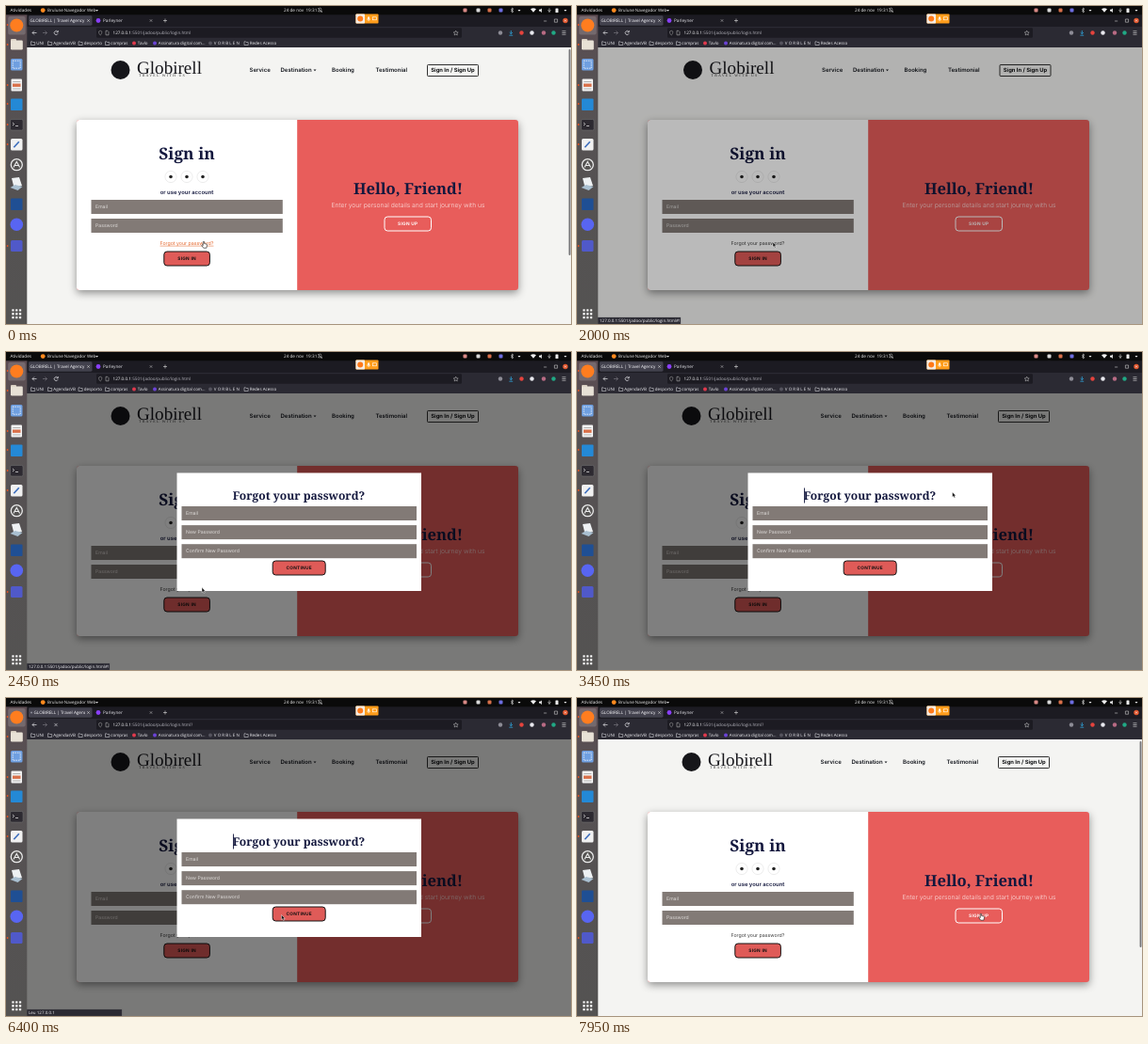
These frames come from a looping animation (600x338 px, 8000 ms). An HTML page:

```html
<!DOCTYPE html>
<html lang="en">
<head>
<meta charset="utf-8">
<title>Sign in</title>
<style>
  html, body { margin: 0; width: 100%; height: 100%; overflow: hidden; background: #000; }
  svg { display: block; width: 600px; height: 338px; }
  text { white-space: pre; text-rendering: geometricPrecision; }
  .ui { font-family: "Open Sans", "Noto Sans", sans-serif; }
  .body { font-family: Inter, "Open Sans", sans-serif; }
  .head { font-family: "Noto Serif", serif; font-weight: 700; fill: #14183e; }
  .brand { font-family: "Liberation Serif", serif; }
  .card { filter: drop-shadow(0 3px 4px rgba(0, 0, 0, .42)); }
</style>
</head>
<body>
<svg id="stage" viewBox="0 0 600 338"></svg>
<script>
const stage = document.getElementById('stage');
const LOOP = 8000;

function add(parent, tag, attrs, content) {
  const node = document.createElementNS('http://www.w3.org/2000/svg', tag);
  for (const key in attrs) node.setAttribute(key, attrs[key]);
  if (content !== undefined) node.textContent = content;
  return parent.appendChild(node);
}
const group = (parent, attrs = {}) => add(parent, 'g', attrs);
const rect = (parent, x, y, width, height, fill, more = {}) =>
  add(parent, 'rect', { x, y, width, height, fill, ...more });
const dot = (parent, cx, cy, r, fill, more = {}) =>
  add(parent, 'circle', { cx, cy, r, fill, ...more });
const line = (parent, d, stroke, width = .7, more = {}) =>
  add(parent, 'path', { d, stroke, 'stroke-width': width, fill: 'none', ...more });
const label = (parent, cls, x, y, size, fill, content, more = {}) =>
  add(parent, 'text', { class: cls, x, y, 'font-size': size, fill, ...more }, content);
const MID = { 'text-anchor': 'middle' };
const SEMI = { 'font-weight': 600 };
const BOLD = { 'font-weight': 700 };
const show = (node, on) => node.setAttribute('visibility', on ? 'visible' : 'hidden');

// ---- page ----
const page = group(stage);
rect(page, 22, 44, 578, 294, '#f4f4f2');

const nav = group(page);
dot(nav, 121.5, 68, 10, '#16161a');
label(nav, 'brand', 139, 72, 19.1, '#17171c', 'Globirell');
label(nav, 'brand', 141, 75.2, 4, '#333', 'TRAVEL WITH US', { 'letter-spacing': 1.25 });
[[258.5, 'Service'], [291.5, 'Destination'], [346, 'Booking'], [392.5, 'Testimonial']]
  .forEach(([x, word]) => label(nav, 'body', x, 70.2, 6.05, '#14171e', word, SEMI));
add(nav, 'path', { d: 'M326.5 67.6h3l-1.5 1.7z', fill: '#14171e' });
rect(nav, 447.5, 62.5, 54, 12, 'none', { rx: .8, stroke: '#1a1a1a', 'stroke-width': .9 });
label(nav, 'body', 474.5, 70.4, 5.85, '#0c0d10', 'Sign In / Sign Up', { ...BOLD, ...MID });

function field(parent, x, y, width, hint) {
  rect(parent, x, y, width, 15, '#827a76');
  label(parent, 'body', x + 4.6, y + 9.2, 5.1, '#dedbd9', hint);
}
function button(parent, x, y, width, word, fill, stroke, ink) {
  rect(parent, x, y, width, 15, fill, { rx: 3.2, stroke, 'stroke-width': 1 });
  label(parent, 'body', x + width / 2, y + 9.2, 4.75, ink, word,
    { ...BOLD, 'letter-spacing': .28, ...MID });
}

rect(page, 75, 121, 469, 181, '#e85d5b', { rx: 3.2, class: 'card' });
add(page, 'path', { d: 'M309.2 121H78.2a3.2 3.2 0 0 0-3.2 3.2v174.6a3.2 3.2 0 0 0 3.2 3.2H309.2z', fill: '#fff' });

label(page, 'head', 192, 162.7, 17.3, '', 'Sign in', MID);
[175, 192, 209].forEach(x => {
  dot(page, x, 181.5, 6.1, '#fff', { stroke: '#d8d8d8', 'stroke-width': .5 });
  dot(page, x, 181.5, 1.8, '#222');
});
label(page, 'body', 192, 199.5, 5.9, '#14183e', 'or use your account', { ...SEMI, ...MID });
field(page, 90.5, 206, 203.3, 'Email');
field(page, 90.5, 226, 203.3, 'Password');
const link = label(page, 'body', 192, 253.8, 5.25, '#333', 'Forgot your password?', MID);
button(page, 167.8, 261, 48.6, 'SIGN IN', '#df5b58', '#151515', '#111');

label(page, 'head', 427, 199.5, 16.55, '', 'Hello, Friend!', MID);
label(page, 'body', 427, 214.1, 6.78, '#fbe3e2', 'Enter your personal details and start journey with us',
  { 'font-weight': 300, ...MID });
button(page, 402, 224, 49.5, 'SIGN UP', 'none', '#fff', '#fff');

const scrollbar = rect(page, 597.6, 46, 1.9, 219, '#77777a', { rx: .9 });
const backdrop = rect(page, 22, 44, 578, 294, '#000');

// ---- dialog ----
const modal = group(stage);
rect(modal, 181.5, 128.5, 259.5, 125.5, '#fff');
label(modal, 'head', 311, 156.8, 12.1, '', 'Forgot your password?', MID);
['Email', 'New Password', 'Confirm New Password']
  .forEach((hint, i) => field(modal, 186.5, 164 + 20.1 * i, 249.5, hint));
button(modal, 283.2, 222, 56, 'CONTINUE', '#df5b58', '#151515', '#111');
const caret = rect(modal, 241, 144.5, .9, 16, '#14183e');

// ---- browser ----
const chrome = group(stage);
rect(chrome, 22, 9, 578, 13, '#1c1b22');
rect(chrome, 22, 22, 578, 22, '#2b2a33');
rect(chrome, 24, 10.3, 67.5, 10.4, '#42414d', { rx: 1.4 });
const tabClip = add(chrome, 'clipPath', { id: 'tab' });
rect(tabClip, 24, 10, 60, 11, '#fff');
const tabText = label(group(chrome, { 'clip-path': 'url(#tab)' }), 'ui', 25.5, 17.2, 4.6, '#fbfbfe',
  'GLOBIRELL | Travel Agency - L');
const tabDot = dot(chrome, 27, 15.5, 1, '#8f8f9d');
const cross = (x, y, r, color) =>
  line(chrome, `M${x - r} ${y - r}l${2 * r} ${2 * r}m0 ${-2 * r}l${-2 * r} ${2 * r}`, color, .6);
cross(87.5, 15.5, 1.2, '#ddd');
dot(chrome, 98, 15.5, 2.4, '#8a3ffc');
label(chrome, 'ui', 103, 17.2, 4.7, '#e4e4ea', 'Parleyner');
cross(154, 15.5, 1.2, '#bbb');
line(chrome, 'M167 15.5h4m-2-2v4', '#ddd', .6);
line(chrome, 'M571 16h3.2M582.4 14h3.2v3.2h-3.2z', '#ccc', .6);
dot(chrome, 594, 15.5, 2.7, '#e2552b');
cross(594, 15.5, 1, '#fff');

line(chrome, 'M32.5 28.5h-4.5m2-2l-2 2 2 2', '#e6e6ea', .7);
line(chrome, 'M39 28.5h4.5m-2-2l2 2-2 2', '#77767f', .7);
const reload = line(chrome, 'M55 27.6a2 2 0 1 0 .1 1.7M55.3 26v1.8h-1.8', '#e6e6ea');
const stop = cross(53, 28.5, 1.6, '#e6e6ea');
rect(chrome, 96, 23.3, 388, 10.4, '#1c1b22', { rx: 1.3 });
line(chrome, 'M98.6 27l1.6-.8 1.6.8c0 2-.4 3.2-1.6 4-1.2-.8-1.6-2-1.6-4z', '#aaa', .5);
line(chrome, 'M106 26.3h1.8l1.2 1.2v3.3h-3z', '#ccc', .5);
const url = label(chrome, 'ui', 113.5, 30.2, 4.6, '#b5b4bd', '');
add(url, 'tspan', { fill: '#fbfbfe' }, '127.0.0.1');
const path = add(url, 'tspan', {}, '');
line(chrome, 'M477.7 26.2l.7 1.6 1.8.2-1.3 1.2.4 1.8-1.6-.9-1.6.9.4-1.8-1.3-1.2 1.8-.2z', '#ccc', .5);
line(chrome, 'M536.3 26v3.6m-1.6-1.5l1.6 1.6 1.6-1.6M534.4 31.2h3.8', '#2fb6f5', .7);
[[525, '#8d8c96'], [547.5, '#e5433d'], [558.5, '#e8e8ee'], [571, '#b96b84'], [581.5, '#20a884']]
  .forEach(([x, c]) => dot(chrome, x, 28.5, 2.2, c));
line(chrome, 'M590.5 26.7h4M590.5 28.5h4M590.5 30.3h4', '#ddd', .6);

const folder = (x, y) =>
  line(chrome, `M${x} ${y}h1.5l.6.7h2.1v3h-4.2z`, '#d5d5da', .55);
[[26.5, 'UNI'], [44.5, 'AgendasVB'], [77, 'desporto'], [105.5, 'compras'], [134, 'Tavlo', '#e0394d'],
 [156, 'Assinatura digital com…', '#6b43d6'], [215, 'V O R B L E N', '#55545e'], [253, 'Redes Acesso']]
  .forEach(([x, name, color]) => {
    if (color) dot(chrome, x + 2, 39.6, 2, color);
    else folder(x, 37.8);
    label(chrome, 'ui', x + 5.8, 41.3, 4.5, '#f0f0f4', name);
  });

const status = group(chrome);
const statusBox = rect(status, 22, 331, 88, 7, '#2b2a33', { stroke: '#4a4953', 'stroke-width': .3 });
const statusText = label(status, 'ui', 24, 336.4, 4.5, '#f0f0f4', '');

// ---- desktop bar ----
rect(stage, 0, 0, 600, 9.3, '#0a0a0a');
label(stage, 'ui', 4.5, 6.3, 4.7, '#eee', 'Atividades');
dot(stage, 39.2, 4.6, 2.4, '#ff8a1e');
label(stage, 'ui', 44, 6.3, 4.5, '#eee', 'Brulune Navegador Web');
add(stage, 'path', { d: 'M95 4h3l-1.5 1.8z', fill: '#ddd' });
label(stage, 'ui', 295, 6.3, 4.65, '#eee', '24 de nov  19:31');
line(stage, 'M331.5 5.8h4l-.7-1.2v-1.2a1.3 1.3 0 0 0-2.6 0v1.2zM331.2 2l4.6 5', '#ddd', .5);
[[487.5, '#d98a86'], [501.5, '#d9d9d9'], [513.5, '#d8704a'], [525.5, '#6d6de0']]
  .forEach(([x, c]) => rect(stage, x - 2, 2.6, 4, 4, c, { rx: 1 }));
line(stage, 'M537.5 2v5m-1.5-3.8l3 2.6-1.5 1.2m-1.5-1.2l3-2.6-1.5-1.2', '#eee', .5);
add(stage, 'path', {
  d: 'M543.5 4h3l-1.5 1.8zM557 3.2q3-2 6 0l-3 3.6zM566 3.8h1.3l1.6-1.4v4.6l-1.6-1.4h-1.3zM592.5 4h3l-1.5 1.8z',
  fill: '#eee'
});
line(stage, 'M577 2.4v2.4m-1.3-.6a1.3 1.3 0 0 0 2.6 0M577 5.6v1.4', '#eee', .6);
rect(stage, 583.5, 2.6, 3, 4.4, '#eee', { rx: .5 });

rect(stage, 371.5, 8.5, 24, 10, '#ff9d1c', { rx: .8 });
rect(stage, 371.5, 8.5, 9.5, 10, '#f4ede6', { rx: .8 });
dot(stage, 376.2, 13.5, 3, '#ff7a1a');
rect(stage, 384.2, 11.3, 1.8, 3.4, '#fff', { rx: .9 });
line(stage, 'M383.4 13.5a1.7 1.7 0 0 0 3.4 0M385.1 15.2v1', '#fff', .5);
rect(stage, 389.4, 11.8, 4, 3, 'none', { stroke: '#fff', 'stroke-width': .6 });

// ---- dock ----
const fade = add(add(stage, 'defs', {}), 'linearGradient', { id: 'dock', x2: 0, y2: 1 });
[[0, '#5c4c52'], [.2, '#565153'], [1, '#545352']]
  .forEach(([offset, color]) => add(fade, 'stop', { offset, 'stop-color': color }));
rect(stage, 0, 9.3, 22.3, 328.7, 'url(#dock)');
rect(stage, 2.2, 11, 18.4, 19.5, '#fff', { opacity: .16, rx: 2 });
dot(stage, 11.3, 20.5, 7, '#ff7d1f');
rect(stage, 5, 35, 6, 4, '#d9cfc2', { rx: 1 });
rect(stage, 5, 36.5, 12.8, 10, '#e8e1d6', { rx: 1.2 });
rect(stage, 5, 56, 12.5, 12.5, '#6f9fe0', { rx: 1.5 });
rect(stage, 7.2, 58.2, 8, 8, 'none', { stroke: '#fff', 'stroke-width': .8, 'stroke-dasharray': '1.4 1' });
rect(stage, 5.5, 77.5, 11.5, 13, '#f2f2f2', { rx: 1 });
line(stage, 'M7.3 80.5h8M7.3 88h8', '#999', .7);
rect(stage, 7, 82.5, 8.5, 3.4, '#d9704a');
rect(stage, 5, 98.5, 12.5, 12.5, '#2489d6', { rx: 1 });
rect(stage, 4.5, 120.5, 13.5, 11.5, '#2d2a31', { rx: 1.5, stroke: '#777', 'stroke-width': .5 });
line(stage, 'M7 124l1.7 1.5L7 127m3 .5h3', '#eee', .7);
rect(stage, 5, 141, 12.5, 12.5, '#f1f1f1', { rx: 1.5 });
line(stage, 'M8.3 150.2l5.5-6', '#3f6fbd', 1.7);
dot(stage, 11.3, 168.7, 6, '#555352', { stroke: '#ececec', 'stroke-width': 1.3 });
line(stage, 'M8 171.5l3.3-6 3.3 6m-5.6-2h4.6', '#ececec', 1.1);
add(stage, 'path', { d: 'M6 183l8-1 3 9-8.500 2z', fill: '#eef1f3' });
add(stage, 'path', { d: 'M4.500 193l5-3 8 2-5 4z', fill: '#a9bfd0' });
rect(stage, 5, 204.5, 12.5, 12.5, '#1f4f94', { rx: 1 });
dot(stage, 11.3, 232.3, 6.8, '#5865f2');
rect(stage, 5, 249, 12.5, 12, '#5059c9', { rx: 1.5 });
[20, 41, 84, 104, 126, 147, 255].forEach(y => dot(stage, 1.6, y, .9, '#e95420'));
for (let i = 0; i < 9; i++)
  rect(stage, 6.3 + 3.8 * (i % 3), 322.3 + 3.8 * Math.floor(i / 3), 2.3, 2.3, '#f3f3f3', { rx: .5 });

// ---- pointer ----
const EDGE = { stroke: '#fff', 'stroke-width': .45, 'stroke-linejoin': 'round' };
const arrow = add(stage, 'path', { d: 'M0 0v5.2l1.2-1 .9 1.9 1-.5-.9-1.8h1.6z', fill: '#111', ...EDGE });
const hand = add(stage, 'path', {
  d: 'M-.7 0q.7-.8 1.3 0v2l2.3.6q.8.3.6 1.2l-.6 2.9h-3.2l-2-2.7q.3-.9 1.6 0z',
  fill: '#fff', stroke: '#111', 'stroke-width': .6
});

// time, x, y
const moves = [
  [0, 210, 250.5], [1900, 210, 250.5], [1950, 208, 251], [2700, 208, 250], [2750, 206, 244],
  [2900, 196, 235], [3150, 340, 160], [3300, 430, 128], [3450, 399.5, 149], [3600, 262, 150],
  [3750, 225, 130], [3900, 213, 150], [4050, 220, 172], [4350, 220, 172], [4500, 226, 205],
  [4750, 274, 233.5], [4950, 322, 236], [5150, 322, 236], [5450, 421, 231], [5750, 296, 232],
  [6000, 296, 232], [6150, 292.5, 230.5], [6500, 292.5, 230.5], [6800, 257, 236], [7150, 215, 220],
  [7450, 196, 238], [7650, 196, 238], [7800, 270, 246], [7950, 429, 229.5], [8000, 429, 229.5]
];
function pointer(t) {
  const i = Math.max(1, moves.findIndex(m => m[0] > t));
  const [a, b] = [moves[i - 1], moves[i]];
  const k = (t - a[0]) / (b[0] - a[0]);
  return [a[1] + (b[1] - a[1]) * k, a[2] + (b[2] - a[2]) * k];
}

const unit = v => Math.min(1, Math.max(0, v));
const within = (t, a, b) => t >= a && t < b;

// cubic-bezier(0, 0, .58, 1)
function easeOut(x) {
  let lo = 0, hi = 1;
  for (let i = 0; i < 20; i++) {
    const s = (lo + hi) / 2;
    if (1.74 * s * s * (1 - s) + s ** 3 < x) lo = s; else hi = s;
  }
  return lo * lo * (3 - 2 * lo);
}

const DIM = 1920, OPEN = 2075, SEND = 6050, DONE = 6500;

function draw(t) {
  const dialog = within(t, DIM, DONE);
  show(backdrop, dialog);
  backdrop.setAttribute('opacity', .5 * unit((t - DIM) / 150));
  show(scrollbar, !dialog);
  nav.setAttribute('transform', `translate(${within(t, DIM, OPEN) ? 1.5 : 0})`);

  const opened = within(t, OPEN, DONE);
  show(modal, opened);
  modal.setAttribute('opacity', unit((t - OPEN) / 150));
  modal.setAttribute('transform', `translate(0 ${-15.6 * (1 - easeOut(unit((t - OPEN) / 300)))})`);
  show(caret, opened && (within(t, 3000, 3700) || within(t, 4000, 4400) || t >= SEND));

  const hover = t < DIM;
  link.setAttribute('fill', hover ? '#e4672d' : '#3a3a3a');
  link.setAttribute('text-decoration', hover ? 'underline' : 'none');

  const loading = within(t, SEND, 6900);
  show(tabDot, loading);
  tabText.setAttribute('x', loading ? 29.5 : 25.5);
  show(stop, loading);
  show(reload, !loading);
  path.textContent = ':5501/jadoo/public/login.html' + (t >= SEND ? '?' : '');

  const sent = within(t, SEND, 6700);
  show(status, sent || within(t, 100, 2700));
  statusBox.setAttribute('width', sent ? 101 : 88);
  statusText.textContent = sent ? 'Leu 127.0.0.1' : '127.0.0.1:5501/jadoo/public/login.html#!';

  const [x, y] = pointer(t);
  const pressing = hover || t >= 7930;
  show(hand, pressing);
  show(arrow, !pressing);
  [hand, arrow].forEach(p => p.setAttribute('transform', `translate(${x} ${y})`));
}

const start = performance.now();
function tick() {
  draw((performance.now() - start) % LOOP);
  requestAnimationFrame(tick);
}
tick();
</script>
</body>
</html>
```
